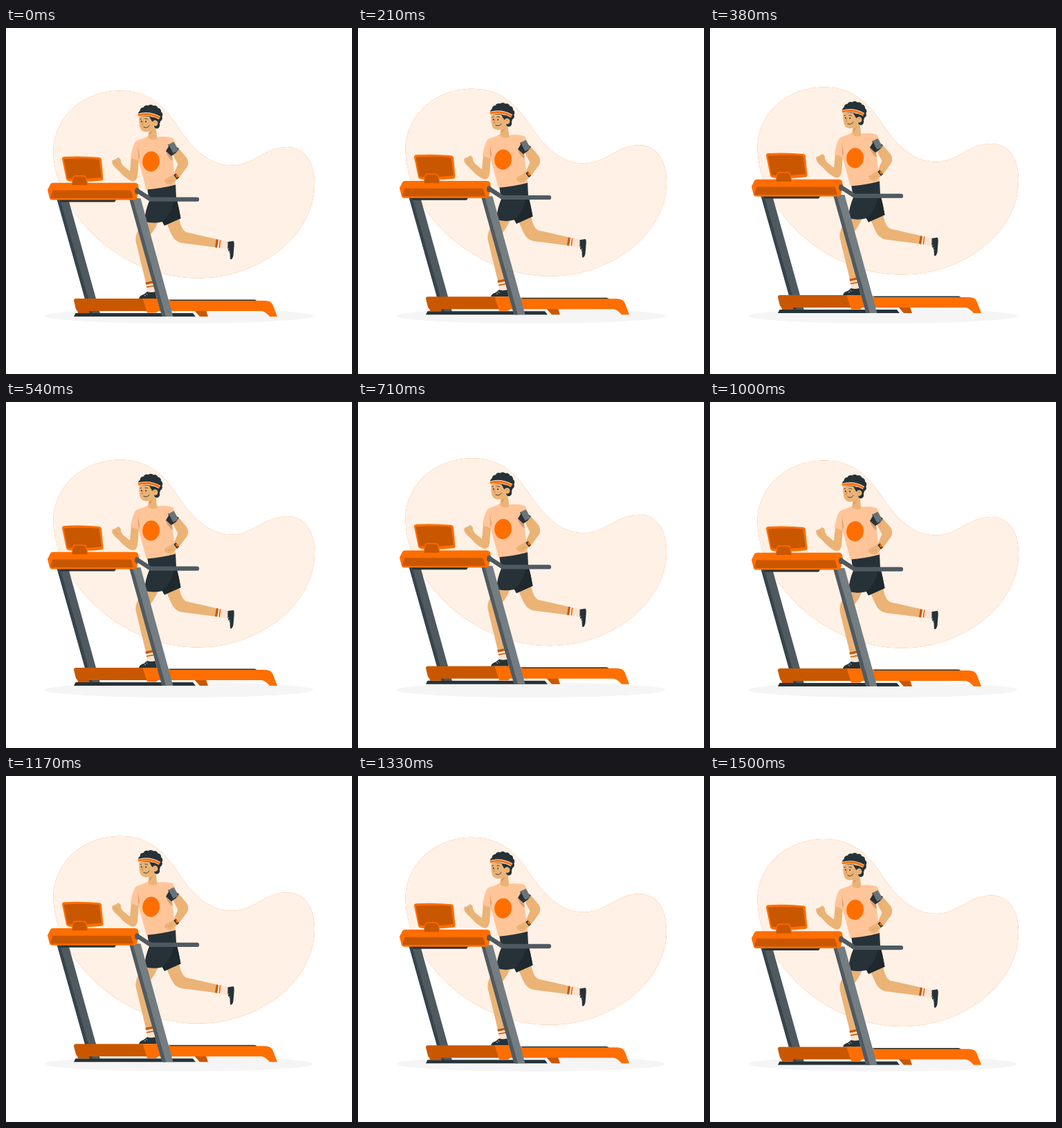
Animation, 500 px wide and 500 px high, one loop 1540 ms. Source, as an HTML page with a canvas:

```html
<!DOCTYPE html>
<html lang="en">
<head>
<meta charset="utf-8">
<title>Treadmill runner</title>
<style>
  html, body { margin: 0; width: 100%; height: 100%; overflow: hidden; background: #fff; }
  canvas { display: block; width: 500px; height: 500px; }
</style>
</head>
<body>
<canvas id="stage"></canvas>
<script>
const canvas = document.getElementById('stage');
const ctx = canvas.getContext('2d');
const ratio = window.devicePixelRatio || 1;
canvas.width = canvas.height = Math.round(500 * ratio);

const LOOP = 1540, PERIOD = 1530, PHASE = 35, LIFT = 10;
const ORANGE = '#ff6e00', RUST = '#c95700', DARK = '#263238', SKIN = '#ebb376',
      SHIRT = '#ffc599', SOCK = '#ffe2cf', STEEL = '#4f5a60', GRAY = '#747d81';

function fill(color, path) {
  ctx.fillStyle = color;
  ctx.fill(new Path2D(path));
}

function line(color, width, path, cap = 'butt') {
  ctx.strokeStyle = color;
  ctx.lineWidth = width;
  ctx.lineCap = cap;
  ctx.lineJoin = 'round';
  ctx.stroke(new Path2D(path));
}

function oval(color, x, y, rx, ry = rx, turn = 0) {
  ctx.fillStyle = color;
  ctx.beginPath();
  ctx.ellipse(x, y, rx, ry, turn, 0, Math.PI * 2);
  ctx.fill();
}

function drawBlob() {
  const blob = 'M68.5 180C68 130 110 90.5 165 90.5C206 90.5 229 113 250 145C272 178 296 198.5 327 198.5' +
    'C358 198.5 374 172 406 172C432 172 446 194 446 225C446 300 366 361.5 278 361.5C163 361.5 70 265 68.5 180Z';
  fill(ORANGE, blob);
  fill('rgba(255,255,255,.9)', blob);
}

function drawBackPost() {
  fill(STEEL, 'M73.5 247H90L136 412.5H120Z');
  fill('#37444b', 'M73.5 247H78L125 412.5H120Z');
}

function drawHead() {
  fill(SKIN, 'M207 146L216 140L218.5 160Q211 164 205 158Z');
  fill('#d59b60', 'M207 151Q212 149 214 145L208 155Z');
  // curls around the crown and down the back of the head
  for (let i = 0; i < 9; i++) {
    const a = Math.PI * (1.08 + i * 0.145);
    oval(DARK, 208.5 + 13.2 * Math.cos(a), 127 + 11.5 * Math.sin(a), 4.8);
  }
  oval(DARK, 208.5, 123, 13, 9);
  oval(DARK, 218, 140.5, 4.2, 5);
  fill(DARK, 'M209 126L224 125L222 139L210 141Z');
  fill(SKIN, 'M192.5 127C192 138 193 146 197 148.5C203 152 209 150 213 144L213 128Z');
  fill(DARK, 'M207 128L218 130L215 137L211 135Z');
  oval(SKIN, 215.5, 137.5, 4, 4.3);
  line('#d0935c', 0.8, 'M214 138Q215 135 217.5 136');
  line(SOCK, 4.8, 'M191 126Q207 121.5 222 130');
  line(ORANGE, 3, 'M191 126Q207 121.5 222 130');
  oval(DARK, 195.7, 135, 0.8, 1.2);
  oval(DARK, 202.2, 135.3, 0.8, 1.2);
  line(DARK, 0.8, 'M193.5 131.8L196 131M200.5 131.2Q203 130.5 205 132');
  line('#d78645', 1, 'M198 135L196.4 140H198.5');
  line(DARK, 0.9, 'M199 143.2Q204 146 207 141', 'round');
}

function drawFrontLeg() {
  fill(SKIN, 'M202 277L220 278Q217 290 206 302L212.5 367L202.5 370L187.5 308Q186 294 202 277Z');
  fill(SOCK, 'M202 368L212.5 365L215.5 386L205 385Z');
  line(RUST, 3.4, 'M201.8 369.3L212.6 367');
  line(RUST, 1.6, 'M203 374.5L213.6 372.5');
  fill(DARK, 'M192 391Q193 386.5 199 385L204 381Q209.5 383 215.5 381L218 391Z');
  line('#fff', 0.7, 'M200 385.7L202 387.5M202.5 383.7L204.5 385.7');
}

function drawBackLeg() {
  fill(SKIN, 'M231 280L250 272Q252 290 260 295L305 305.2L303.5 317Q275 313.2 253 310.5Q244 308.5 239 298Z');
  fill(SOCK, 'M304 305L322 308.7L321 320L303 317Z');
  line(RUST, 3.2, 'M305.4 305.4L303.6 317.2');
  line(RUST, 1.3, 'M309.7 306.5L308.3 317.7');
  fill(DARK, 'M320.5 309L328.5 307.8Q330 309 329.7 314L328.5 329Q327 335.5 324 334L323.5 325Q319.5 320 320.5 316Z');
  line('#fff', 0.7, 'M320 320L322.2 318.5M322 323.5L324 322');
}

function drawShorts() {
  fill(DARK, 'M204 231L245 225L246 245Q250 260 252.5 275L229 285.5L226 280Q212 283.5 200 279.5Q201 264 207 250Z');
  fill('#1e282d', 'M246 245Q250 260 252.5 275L229 285.5L226 280Q241 266 243 247Z');
}

function drawTorso() {
  fill(SKIN, 'M181 187L192 190L190 214Q188 223 181 221Q172 217 163 206.5L157 201' +
    'Q151.5 195 154 191Q159 190 162 187Q167 189 166 194L169 199L179 207Z');
  line('#d59b60', 0.7, 'M157 193L162 199');
  fill(SHIRT, 'M204 156.5C198 161 190 161 186.5 165C183 171 181 181 180 187.5L191.5 191.5L203 233.5' +
    'Q224 232 245 226.5L240 182L248 174L241 159Q231 156 219 157.5Q211 163 204 156.5Z');
  fill('#d99b70', 'M190.5 171L193 185L191.5 191.5Z');
  fill('#d99b70', 'M231 179L240 184L240.5 192Q234 187 231 179Z');
  oval(ORANGE, 209.6, 192.9, 12.4, 14.6, 0.1);
}

function drawBackArm() {
  fill(SKIN, 'M240 181L250 174.5L261.5 188Q265 195 261.5 201L250 216.5L242 212L248.5 197Z');
  fill(SKIN, 'M229 219Q236 215 243 211L248 218Q242 224 238 226.5Q232 226 229 222Z');
  line('#d59b60', 0.7, 'M234 222L241 219');
  line(DARK, 4, 'M244 211.5L248.5 217.5');
  oval(ORANGE, 247, 214, 1.7, 2.3, -0.6);
  fill(DARK, 'M231 178L237 167.5L250 174L246 180L239 185Z');
  fill('#68747a', 'M234.5 168.5L242.5 164.5L249.5 177L241 181Z');
  line(DARK, 1, 'M234.5 168.5L241 181');
}

function drawBase() {
  fill(DARK, 'M100.5 412H270L274 417H98Z');
  fill(RUST, 'M102 404H118L121 412H104Z');
  fill(DARK, 'M236 392.5H359Q363 393 363 396H236Z');
  fill(RUST, 'M272 408H289L292 417H280Z');
  fill(RUST, 'M98 394Q98 391 101 391H200L205 409H105Q102 409 101 406Z');
  fill(ORANGE, 'M197.5 391H233L238 394H374Q383 394 385.5 400L392 417H381Q374 409 369 409H220L217 411.5H204Z');
}

function drawFrontPost() {
  fill(GRAY, 'M178 246H194.5L241.5 417H225.5Z');
  fill(STEEL, 'M178 246H183L231 417H225.5Z');
}

function drawConsole() {
  fill(DARK, 'M78 247H160L157 251.5H79Z');
  line(STEEL, 6.3, 'M189.5 235L209 247.7H276', 'round');
  fill(ORANGE, 'M64 226Q65 223.8 68 223.8H186Q190 223.8 191 227L192 233L189 246Q188 248.5 185 248.5' +
    'H67Q64 248.5 63 246L60 234Z');
  fill(RUST, 'M67.5 234.5H179Q181 234.5 181.5 237L184 246H66Q64 245 65 242Z');
  oval(STEEL, 189.5, 235.5, 3.4, 4.5);
}

function drawMonitor() {
  fill(ORANGE, 'M81 189Q81 186.5 84 186Q110 184.5 135 187Q137.5 187.5 138 190L140.5 217' +
    'Q140.5 220 138 220.5Q115 223 92 221.5Q88 221 87 218Z');
  fill(RUST, 'M83.5 189.5Q110 187.5 134.5 189.7L138 216Q115 219 89 217.5Z');
  fill(ORANGE, 'M96 217Q97 213 101 213H112Q115.5 213 116.5 217L119 226H95Z');
  fill(RUST, 'M97 218Q98 214.5 101 214.5H111Q114.5 214.5 115.5 218L117.5 227H95.5Z');
}

const layers = [drawBlob, drawBackPost, drawBackLeg, drawFrontLeg, drawShorts, drawTorso,
  drawBackArm, drawHead, drawBase, drawFrontPost, drawConsole, drawMonitor];

// Linear rise and fall
function floatOffset(ms) {
  const p = ((ms + PHASE) % PERIOD) / PERIOD;
  return -LIFT * (1 - Math.abs(1 - 2 * p));
}

function render(ms) {
  ctx.setTransform(ratio, 0, 0, ratio, 0, 0);
  ctx.fillStyle = '#fff';
  ctx.fillRect(0, 0, 500, 500);
  oval('#f5f5f5', 250, 416, 194, 11);
  ctx.translate(0, floatOffset(ms) - floatOffset(0));
  layers.forEach(draw => draw());
}

const start = performance.now();
function tick() {
  render((performance.now() - start) % LOOP);
  requestAnimationFrame(tick);
}
tick();
</script>
</body>
</html>
```
